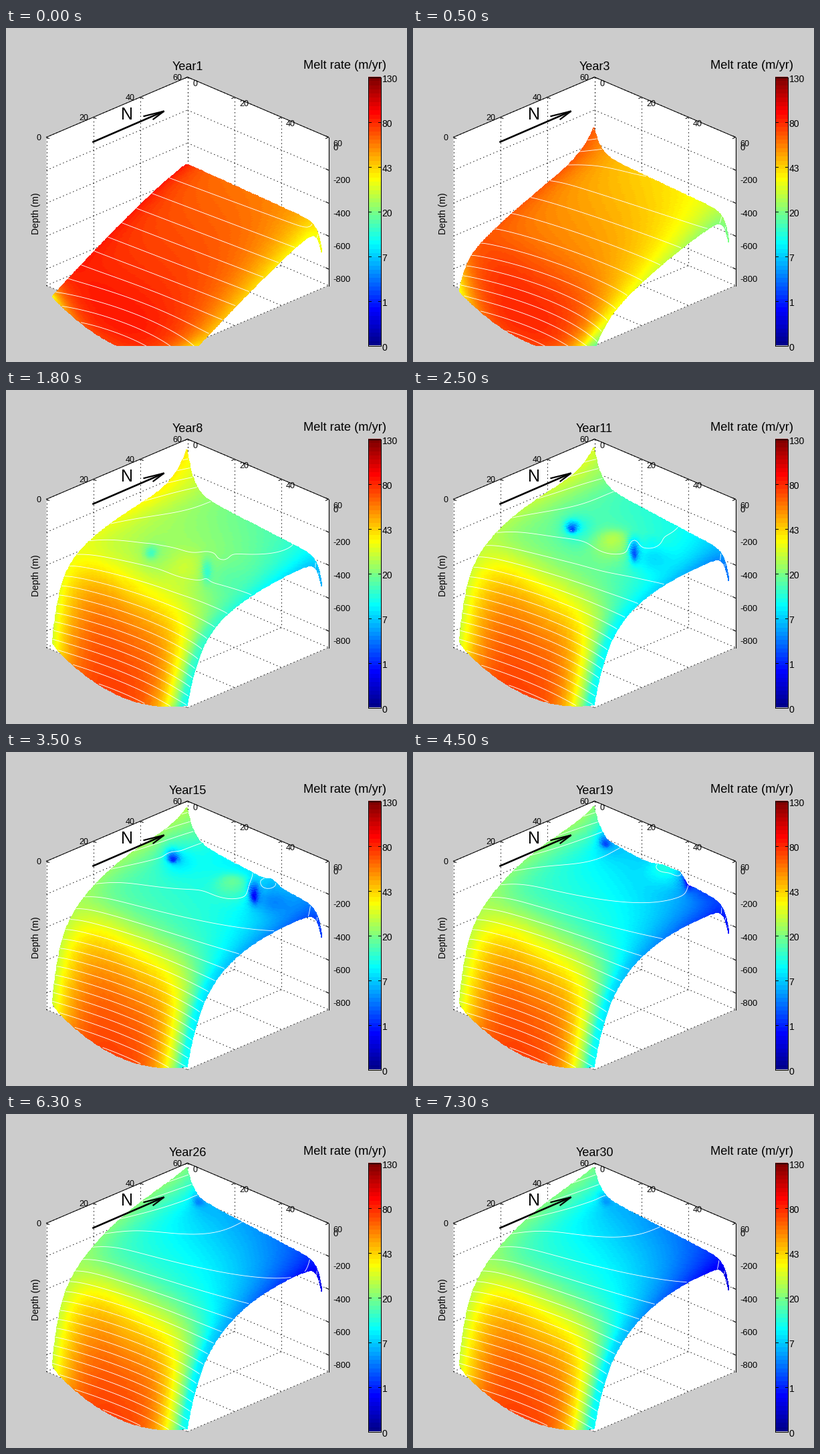
Write a matplotlib script that moves like this. It is 600 px wide and 500 px high and loops after 7500 ms.

```python
import numpy as np
import matplotlib.pyplot as plt
from matplotlib.animation import FuncAnimation
from matplotlib.colors import LinearSegmentedColormap
from matplotlib.patches import Polygon, Rectangle

W, H, DPI = 600, 500, 100
PX = 72 / DPI
STEP = 222 / 18  # pixels per 50 m of depth

plt.rcParams["font.family"] = "Liberation Sans"
jet = LinearSegmentedColormap.from_list("melt", [
    (0, (0, 0, .55)), (.125, (0, 0, 1)), (.375, (0, 1, 1)),
    (.625, (1, 1, 0)), (.875, (1, 0, 0)), (1, (.5, 0, 0))], N=128)

# u runs across the shelf, v inland; far rows first so near cells cover them.
U, V = np.meshgrid(.5 - .5 * np.cos(np.pi * np.linspace(0, 1, 110)),
                   np.linspace(1, 0, 130) ** 1.5)
WEST = np.exp(-U / .045)
CORNER = np.exp(-(2 - U - V) / .03)
MIDDLE = np.sin(np.pi * U).clip(0) ** .7
CLIFF = np.exp(-(V / (.05 + .07 * MIDDLE + .03 * U)) ** (1 + .6 * MIDDLE))
CORE = (1 - np.abs((U - .46) / .5) ** 3).clip(0)


def depth_field(front, plateau, tilt, slope, power, tip, reach, rim=1):
    """Plateau rising to a tip at the back and dropping over an ice cliff."""
    front = front + 4 * U + 120 * U * (1 - U)
    ramp = slope * (rim + (1 - rim) * MIDDLE)
    top = plateau + tilt * U
    peak = tip * WEST * np.exp((V - 1) / reach)
    return (top - peak + ramp * (1 - V) ** power
            + (front - top - ramp) * CLIFF + 40 * CORNER)


def melt_field(level, back, side, rim, hot, chill):
    """Melt falls inland and eastward; the front face is hot, its rims cool."""
    inland = V * (back * (1 - np.exp(-U / .08)) + side * U)
    face = hot * CORE * np.exp(-(V / .23) ** 2.5)
    edge = chill * (1 - .8 * CORE) * np.exp(-V / .05)
    return level - inland - rim * U ** 6 + face - edge


DEPTHS = (depth_field(238, 126, 6, 112, 1.2, 0, .1),
          depth_field(222, 89, 12, 75, 2, 72, .1, rim=.7),
          depth_field(217, 40, 19, 90, 3, 38, .5))
MELTS = (melt_field(.85, .08, .03, .13, .02, .28),
         melt_field(.72, .10, .12, .12, .13, .18),
         melt_field(.50, .18, .11, .12, .31, 0))


def blob(u0, v0, across, along):
    """Gaussian with axes horizontal and vertical on screen."""
    du, dv = U - u0, V - v0
    return np.exp(-((du + dv) / across) ** 2 - ((du - dv) / along) ** 2)


def surface(year):
    if year <= 5:
        first, p = 0, (year - 1) / 4
    else:
        tau = 2 + V * (5 + 4 * U)
        first, p = 1, (1 - np.exp((5 - year) / tau)) / (1 - np.exp(-25 / tau))
    depth, melt = (s[first] + p * (s[first + 1] - s[first])
                   for s in (DEPTHS, MELTS))

    # Two channels drift inland and fade at the grounding line.
    grow = np.clip((year - 6) / 5, 0, 1)
    drift = .05 * (year - 11)

    west = grow * np.exp(-max(year - 15, 0) / 12)
    wu, wv = np.clip(.255 - .036 * (year - 11), .11, .3), min(.58 + drift, .97)
    pit = blob(wu, wv, .045, .07)
    melt = melt - west * (.22 * pit + .07 * blob(wu + .03, wv, .12, .2))
    depth = depth + west * 5 * pit

    east = grow * np.exp(-max(year - 19, 0) / 2)
    eu, ev = .645, .65 + drift
    crest = blob(eu, min(ev + .12, 1), .06, .1)
    hill = blob(eu - .1, ev - .05, .14, .2)
    slit = blob(eu, ev, .04, .15)
    wake = blob(eu + .12, ev, .14, .2)
    melt = melt + east * (.1 * hill - .25 * slit - .07 * wake)
    depth = depth + east * (8 * slit - 10 * hill - 8 * crest)
    return depth, np.clip(melt, .08, 1)


fig = plt.figure(figsize=(W / DPI, H / DPI), dpi=DPI, facecolor="#cccccc")
ax = fig.add_axes([0, 0, 1, 1])
ax.set(xlim=(-.5, W - .5), ylim=(H - .5, -.5))
ax.autoscale(False)
ax.axis("off")


def line(x, y, width=1, z=1, **kw):
    ax.plot(x, y, color="black", lw=width * PX, zorder=z, **kw)


def label(x, y, text, size, ha="center", va="center_baseline", **kw):
    return ax.text(x, y, text, fontsize=size * PX, ha=ha, va=va, zorder=8, **kw)


def project(a, b, drop=0):
    return 60 + 211 * (a + b), 163 + 90 * (a - b) + drop


def segment(p, q, **kw):
    line((p[0], q[0]), (p[1], q[1]), **kw)


def draw_box():
    corners = [project(0, 0), project(0, 1), project(1, 1),
               project(1, 1, 222), project(1, 0, 222), project(0, 0, 222)]
    ax.add_patch(Polygon(corners, fc="white", ec="none", zorder=0))
    dots = dict(ls=(0, (1.4, 4)))
    for k in range(4):
        f = k / 3
        segment(project(0, f), project(0, f, 222), **dots)
        segment(project(f, 1), project(f, 1, 222), **dots)
        segment(project(0, f, 222), project(1, f, 222), **dots)
        segment(project(f, 0, 222), project(f, 1, 222), **dots)
        shift = 3 * (k > 0)
        x, y = project(0, f)
        segment((x, y), (x + 4, y + 2))
        label(x - 12 - shift, y, str(20 * k), 12.5)
        x, y = project(f, 1)
        segment((x, y), (x - 4, y + 2))
        label(x + 11 + shift, y + 9, str(20 * k), 12.5)
    for k in range(5):
        drop = 4 * STEP * k
        segment(project(0, 0, drop), project(0, 1, drop), **dots)
        segment(project(0, 1, drop), project(1, 1, drop), **dots)
        segment((478, 161 + drop), (482, 163 + drop))
        label(489, 178 + drop, str(-200 * k), 13, ha="left")
    for p, q in zip(corners[:3], corners[1:4]):
        segment(p, q)
    label(45, 277, "Depth (m)", 14, va="center", rotation=90)


def draw_arrow():
    line((130, 235), (170, 124.5), width=2.6, z=7)
    line((206, 236, 220), (131.5, 124, 136), width=2.2, z=7,
         solid_joinstyle="miter")
    label(181, 127, "N", 25)


def draw_colorbar():
    left, right, top, bottom = 541.5, 560, 73, 475
    ax.imshow(np.linspace(1, 0, 64)[:, None], cmap=jet, vmin=0, vmax=1,
              extent=(left, right, bottom, top), aspect="auto",
              interpolation="nearest", zorder=2)
    ax.add_patch(Rectangle((left, top), right - left, bottom - top,
                           fill=False, ec="black", lw=PX, zorder=3))
    for k, value in enumerate((0, 1, 7, 20, 43, 80, 130)):
        y = bottom - k * (bottom - top) / 6
        line((left, left + 4), (y, y), z=4)
        line((right - 4, right), (y, y), z=4)
        label(562, y + 2, str(value), 14, ha="left")
    label(507, 54, "Melt rate (m/yr)", 18.3)


draw_box()
draw_arrow()
draw_colorbar()
title = label(271, 56, "Year1", 18)
window = Rectangle((60, 73), 422, 402, transform=ax.transData)
shown = {"year": None, "artists": []}


def update(frame):
    pair, phase = divmod(frame, 5)
    year = 1 + 2 * pair + (phase >= 3)
    if year == shown["year"]:
        return shown["artists"]
    for artist in shown["artists"]:
        artist.remove()

    depth, melt = surface(year)
    x = 68.4 + 201.5 * (U + V)
    y = 163 + 86 * (U - V) + depth
    cells = (melt[1:, 1:] + melt[:-1, 1:] + melt[1:, :-1] + melt[:-1, :-1]) / 4
    mesh = ax.pcolormesh(x, y, cells, cmap=jet, vmin=0, vmax=1, zorder=5,
                         edgecolors="face", linewidth=.7, antialiased=False)
    lines = ax.contour(x, y, depth, levels=STEP * np.arange(1, 22),
                       colors="white", linewidths=.85 * PX, zorder=6)
    for artist in (mesh, lines):
        artist.set_clip_path(window)
    title.set_text(f"Year{year}")
    shown.update(year=year, artists=[mesh, lines])
    return shown["artists"]


anim = FuncAnimation(fig, update, frames=75, interval=100, repeat=True,
                     repeat_delay=0, init_func=lambda: [], blit=False)
plt.show()
```
